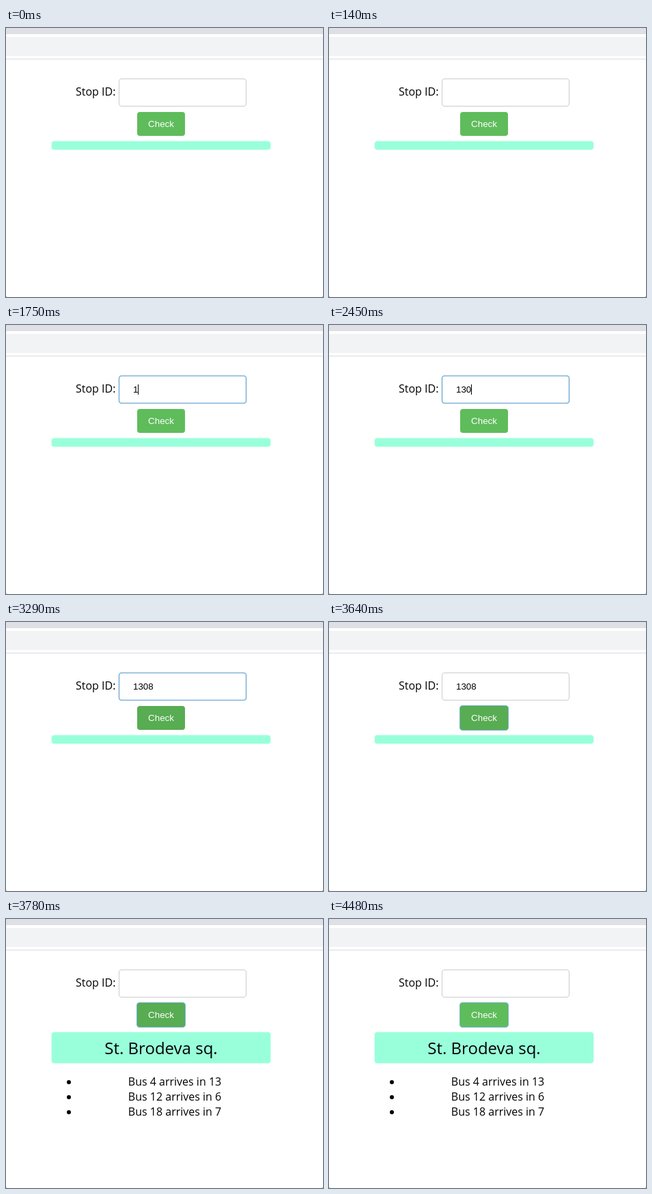
An HTML page for the animation above (4.83 s loop, 464 by 394 pixels).

```html
<!DOCTYPE html>
<html lang="en">
<head>
<meta charset="utf-8">
<title>Stop checker</title>
<style>
html, body { margin: 0; width: 100%; height: 100%; overflow: hidden; background: #888; }
svg { display: block; }
text { font: 16px "Open Sans", sans-serif; }
.control { font: 13.33px "Liberation Sans", Arial, sans-serif; }
.title { font-size: 24px; }
.middle { text-anchor: middle; }
</style>
</head>
<body>
<svg width="464" height="394" viewBox="0 0 464 394">
  <defs>
    <clipPath id="window"><rect width="464" height="394" rx="2"/></clipPath>
    <filter id="glow" x="-5%" y="-50%" width="110%" height="200%"><feGaussianBlur stdDeviation="1"/></filter>
  </defs>
  <g clip-path="url(#window)">
    <rect width="464" height="394" fill="#fff"/>
    <rect width="464" height="9" fill="#dee0e6"/>
    <rect y="13" width="464" height="28" fill="#f2f3f5"/>
    <rect y="45" width="464" height="1" fill="#dadce0"/>

    <text x="102" y="99">Stop ID:</text>
    <rect id="field" x="165.5" y="74.5" width="186" height="40" rx="3.5" fill="#fff"/>
    <text id="typed" class="control" x="186" y="99"></text>
    <rect id="caret" y="87" width="1" height="15"/>

    <rect id="ring" x="191" y="122" width="72" height="37" rx="4.5" fill="#76b4d2"/>
    <rect id="button" x="192" y="123" width="70" height="35" rx="4"/>
    <text class="control middle" x="227" y="145" fill="#fff">Check</text>

    <rect class="bar" x="67" y="166" width="320" rx="4" fill="#99ffda" filter="url(#glow)"/>
    <rect class="bar" x="67" y="166" width="320" rx="4" fill="#99ffda"/>
    <g id="result">
      <text class="title middle" x="227" y="198">St. Brodeva sq.</text>
    </g>
  </g>
</svg>
<script>
const LOOP = 4830;
const FOCUS = 1190, HOVER = 3220, CLICK = 3640, CLEAR = 3710, RESULT = 3780, LEAVE = 4340;
const STOP_ID = '1308';
const KEY_TIMES = [1750, 2030, 2450, 2730];
const ARRIVALS = [[4, 13], [12, 6], [18, 7]];
const DIGIT_WIDTH = 7.41;

const byId = id => document.getElementById(id);
const set = (el, attrs) => Object.entries(attrs).forEach(([name, value]) => el.setAttribute(name, value));
const show = (id, visible) => set(byId(id), { visibility: visible ? 'visible' : 'hidden' });

byId('result').innerHTML += ARRIVALS.map(([bus, minutes], i) => `
  <circle cx="92" cy="${239 + 22 * i}" r="3"/>
  <text class="middle" x="247" y="${244 + 22 * i}">Bus ${bus} arrives in ${minutes}</text>`).join('');

// Share of the hover colour, changing in 70 ms steps
function hoverAmount(t) {
  const steps = start => Math.floor((t - start) / 70) + 1;
  if (t < HOVER) return 0;
  return t < LEAVE ? Math.min(1, steps(HOVER) / 2) : Math.max(0, 1 - steps(LEAVE) / 3);
}

function buttonColor(amount) {
  const mix = (from, to) => Math.round(from + (to - from) * amount);
  return `rgb(${mix(95, 88)},${mix(188, 172)},${mix(91, 82)})`;
}

function draw(t) {
  const focused = t >= FOCUS && t < CLICK;
  const count = t < CLEAR ? KEY_TIMES.filter(time => t >= time).length : 0;
  const done = t >= RESULT;

  set(byId('field'), { stroke: focused ? '#7fb2d6' : '#ccc', 'stroke-width': focused ? 1.6 : 1 });
  byId('typed').textContent = STOP_ID.slice(0, count);
  set(byId('caret'), { x: Math.round(186 + count * DIGIT_WIDTH) });
  show('caret', focused && t < HOVER);

  set(byId('button'), { fill: buttonColor(hoverAmount(t)) });
  show('ring', t >= CLICK);

  document.querySelectorAll('.bar').forEach(bar => set(bar, { height: done ? 45 : 12 }));
  show('result', done);
}

function tick() {
  draw(performance.now() % LOOP);
  requestAnimationFrame(tick);
}
tick();
</script>
</body>
</html>
```
